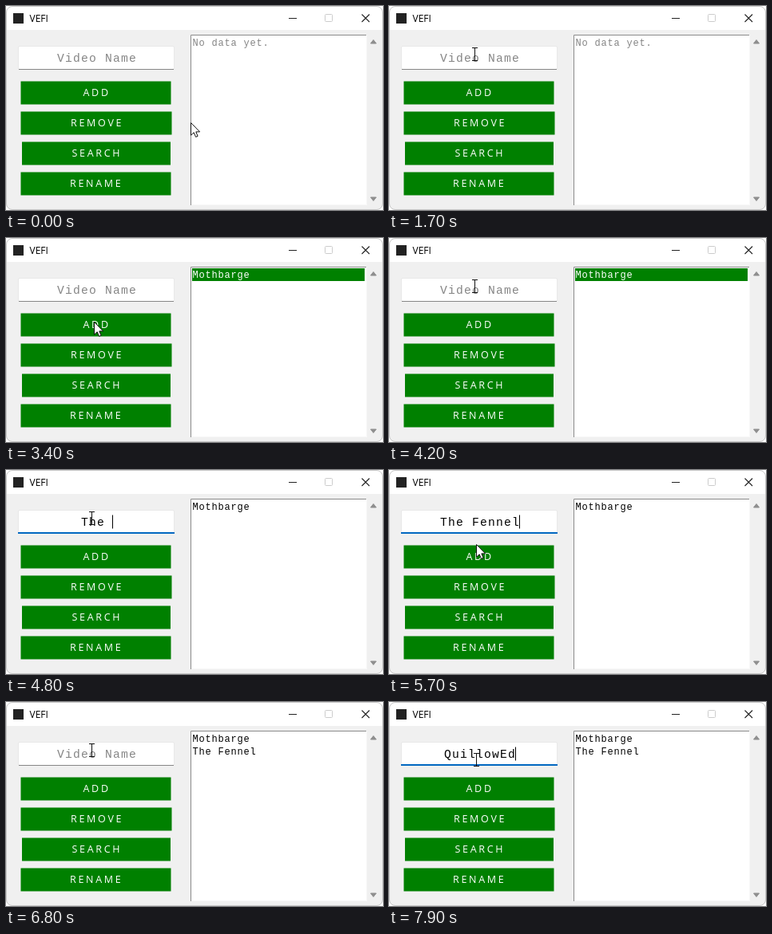
Write an HTML page that moves like this. It is 472 px wide and 256 px high and loops after 8000 ms.

```html
<!DOCTYPE html>
<html lang="en">
<head>
<meta charset="utf-8">
<title>Video list</title>
<style>
  html, body { margin: 0; width: 100%; height: 100%; overflow: hidden; background: #fff; }
  svg { display: block; width: 472px; height: 256px; }
  text { white-space: pre; }
  .ui { font-family: "Open Sans", "Noto Sans", sans-serif; }
  .mono { font-family: "Liberation Mono", "Courier New", monospace; }
  .btn { font-size: 12.5px; letter-spacing: 2.7px; fill: #fff; }
  .item { font-size: 12px; letter-spacing: .8px; }
  .field { font-size: 14.667px; letter-spacing: 1.2px; text-anchor: middle; }
</style>
</head>
<body>
<svg viewBox="0 0 472 256" xmlns="http://www.w3.org/2000/svg">
  <rect width="472" height="256" rx="8" fill="#f0f0f0"/>
  <path d="M0 30V8Q0 0 8 0H464Q472 0 472 8V30Z" fill="#fff"/>
  <rect x=".5" y=".5" width="471" height="255" rx="7.5" fill="none" stroke="#c8c8c8"/>
  <rect x="9" y="9" width="13" height="13" fill="#222"/>
  <text class="ui" x="29.5" y="20" font-size="12">VEFI</text>
  <g fill="none" stroke="#222">
    <path d="M354 15.5h10"/>
    <rect x="399.5" y="10.5" width="9" height="9" rx="1" stroke="#ccc"/>
    <path d="M445.5 10.5l9.5 9.5m0-9.5l-9.5 9.5" stroke-width="1.1"/>
  </g>

  <rect x="15.5" y="50.5" width="195" height="29" rx="1.5" fill="#fff" stroke="#e8e8e8"/>
  <rect id="line"/>
  <text id="entry" class="mono field" x="114.1" y="70"></text>
  <path id="caret" d="M0 56.5v17" stroke="#000"/>

  <g id="buttons"></g>

  <rect x="231" y="36" width="221" height="214" fill="#fff"/>
  <path d="M231.5 250V36.5H451" fill="none" stroke="#8c8c8c"/>
  <path d="M451.5 36V249.5H232" fill="none" stroke="#f8f8f8"/>
  <path d="M456.5 47l3.5-4.5 3.5 4.5zM456.5 240l3.5 4.5 3.5-4.5z" fill="#8f8f8f" stroke="#8f8f8f" stroke-linejoin="round"/>
  <rect id="mark" x="233" width="216" height="16" fill="#008000"/>
  <text id="row0" class="mono item" x="233.4" y="50"></text>
  <text id="row1" class="mono item" x="233.4" y="66"></text>

  <path id="arrow" d="M.5 .5V16.2L4.2 12.8 6.6 18.4 9.1 17.3 6.8 11.9H11.6Z" fill="#fff" stroke="#111"/>
  <path id="beam" d="M-3-7.5H4M.5-8V9M-3 8.5H4" fill="none" stroke="#111"/>
</svg>
<script>
const LOOP = 8000, STEP = 100, BLINK = 450;
const $ = id => document.getElementById(id);
const show = (el, on) => el.setAttribute('visibility', on ? 'visible' : 'hidden');
const set = (el, attrs) => { for (const k in attrs) el.setAttribute(k, attrs[k]); };

// focus, typing span, button click, row deselect (ms)
const entries = [
  { text: 'Mothbarge', focus: 1900, from: 1900, to: 2500, add: 3400, clear: 4300 },
  { text: 'The Fennel', focus: 4400, from: 4400, to: 5300, add: 6100, clear: 6800 },
  { text: 'QuillowEd', focus: 6900, from: 7100, to: 7600, add: Infinity, clear: Infinity }
];

// pointer stops: time, x, y
const path = [
  [0, 231, 146], [1000, 231, 146], [1700, 107, 60],
  [2600, 107, 60], [3200, 110, 105], [3500, 110, 105], [4100, 107, 60],
  [5300, 107, 60], [5900, 110, 105], [6200, 110, 103], [6700, 107, 60],
  [7700, 107, 60], [7900, 109, 72], [LOOP, 109, 72]
];

// label, left, width, text left
const buttons = [
  ['ADD', 18.5, 188, 96.5], ['REMOVE', 18.5, 189, 81],
  ['SEARCH', 20, 186, 82.5], ['RENAME', 18.5, 188, 80]
];
$('buttons').innerHTML = buttons.map(([label, x, w, tx], i) => {
  const y = 94.5 + 38 * i;
  return `<rect x="${x}" y="${y}" width="${w}" height="29" fill="#008000"/>` +
    `<text class="ui btn" x="${tx}" y="${y + 18.5}">${label}</text>`;
}).join('');

function pointer(t) {
  const i = path.findIndex((p, n) => n && t <= p[0]);
  const [t0, x0, y0] = path[i - 1], [t1, x1, y1] = path[i];
  const k = (t - t0) / (t1 - t0), e = k * k * (3 - 2 * k);
  return [Math.round(x0 + (x1 - x0) * e), Math.round(y0 + (y1 - y0) * e)];
}

function drawField(t) {
  const cur = entries.find(e => t >= e.focus && t < e.add);
  let text = 'Video Name';
  if (cur) {
    const k = Math.min(1, Math.max(0, (t - cur.from) / (cur.to - cur.from)));
    text = cur.text.slice(0, Math.floor(cur.text.length * k + 1e-6));
    const x = Math.floor(113.5 + text.length * 5) + .5;
    $('caret').setAttribute('transform', `translate(${x} 0)`);
  }
  $('entry').textContent = text;
  set($('entry'), { fill: cur ? '#000' : '#858585' });
  set($('line'), cur
    ? { x: 15, y: 78, width: 196, height: 2, fill: '#0067c0' }
    : { x: 16, y: 79, width: 194, height: 1, fill: '#868686' });
  show($('caret'), cur && Math.floor((t - cur.focus) / BLINK) % 2 === 0);
}

function drawList(t) {
  const added = entries.filter(e => t >= e.add);
  const sel = added.findIndex(e => t < e.clear);
  for (const i of [0, 1]) {
    const row = $('row' + i);
    row.textContent = added[i] ? added[i].text : i ? '' : 'No data yet.';
    set(row, { fill: !added.length ? '#858585' : i === sel ? '#fff' : '#000' });
  }
  show($('mark'), sel >= 0);
  set($('mark'), { y: 38 + 16 * Math.max(0, sel) });
}

function drawPointer(t) {
  const [x, y] = pointer(t);
  const inField = x > 15 && x < 211 && y > 50 && y < 80;
  for (const id of ['arrow', 'beam']) {
    set($(id), { transform: `translate(${x} ${y})` });
    show($(id), (id === 'beam') === inField);
  }
}

function draw(ms) {
  const t = Math.floor((ms % LOOP) / STEP) * STEP;
  drawField(t);
  drawList(t);
  drawPointer(t);
}

const start = performance.now();
function tick() {
  draw(performance.now() - start);
  requestAnimationFrame(tick);
}
draw(0);
requestAnimationFrame(tick);
</script>
</body>
</html>
```
